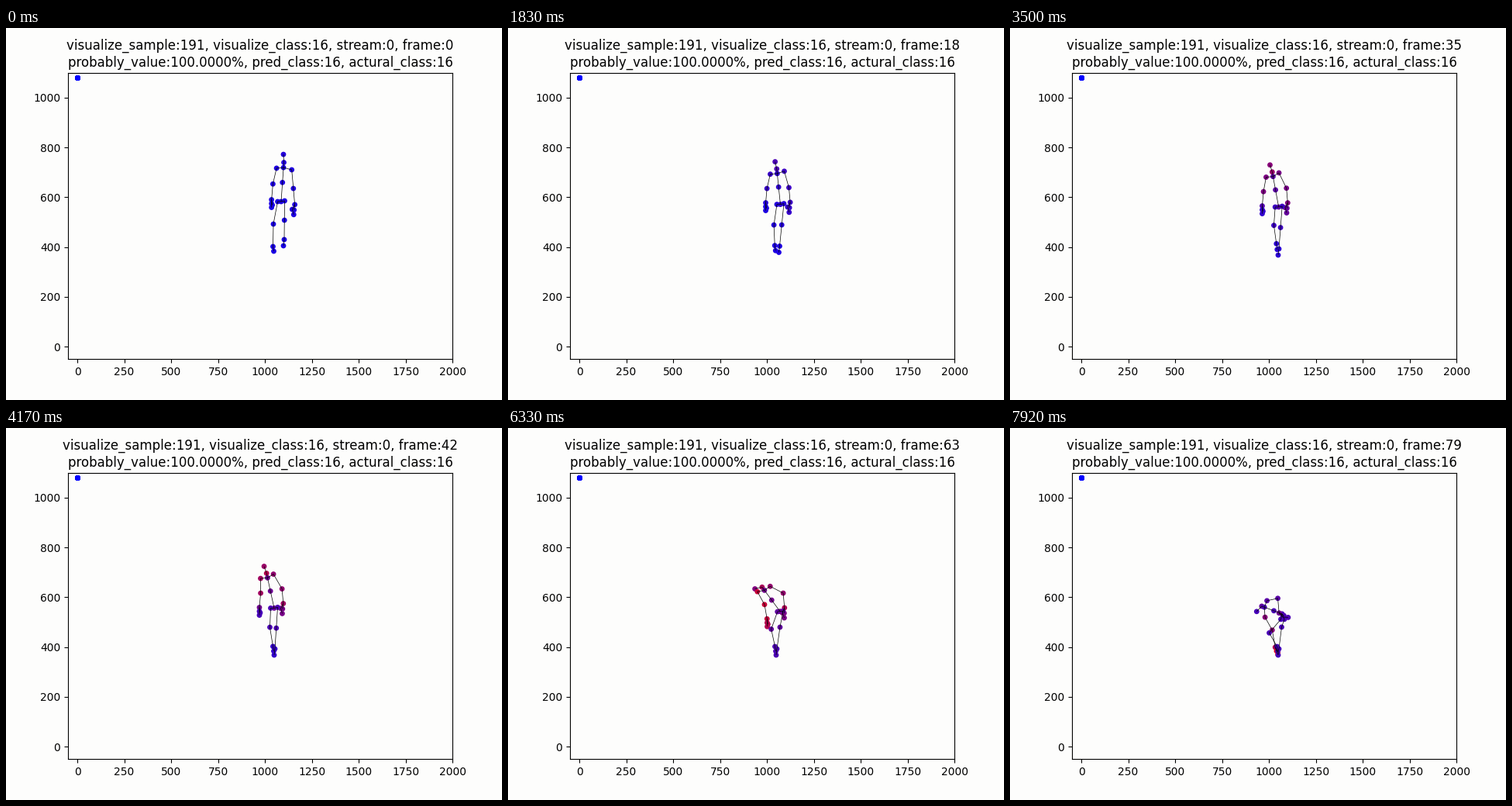
A matplotlib script that plays this animation: 640 by 480 pixels, repeating every 8000 ms.

```python
import numpy as np
import matplotlib.pyplot as plt
from matplotlib.animation import FuncAnimation
from matplotlib.collections import LineCollection

W, H, DPI = 640, 480, 100
LOOP_MS, STEP_MS = 8000, 40
XLIM, YLIM = (-50, 2000), (-50, 1100)
PAPER = "#fdfdfc"

# Joints that share a colour: names, peak share of red, pose where it peaks
GROUPS = [
    ("head", .52, 48),
    ("neck", .65, 51),
    ("chest mid base", .38, 54),
    ("l_shoulder l_elbow", .70, 58),
    ("l_wrist", .68, 67),
    ("l_palm l_thumb l_tip", .80, 79),
    ("r_shoulder r_elbow", .53, 53),
    ("r_wrist", .62, 55),
    ("r_palm r_thumb r_tip", .42, 53),
    ("l_hip r_hip l_knee r_knee", .28, 60),
    ("l_ankle l_foot r_ankle r_foot", .20, 66),
]
JOINTS = [j for names, _, _ in GROUPS for j in names.split()]

CHAINS = ["head neck chest mid base"]
for side in "lr":
    CHAINS += [c.replace("*", side + "_") for c in (
        "chest *shoulder *elbow *wrist *palm *tip",
        "*wrist *thumb",
        "base *hip *knee *ankle *foot")]
CHAINS = [[JOINTS.index(j) for j in c.split()] for c in CHAINS]


def ease(n, start, end):
    u = min(max((n - start) / (end - start), 0), 1)
    return u * u * (3 - 2 * u)


def ray(p, length, deg):
    """Point at a distance from p; 0 degrees hangs down, 90 points right."""
    a = np.radians(deg)
    return p + length * np.array([np.sin(a), np.cos(a)])


def to_data(p):
    """Stage pixels, y down, to axes data."""
    return ax.transData.inverted().transform(p * [1, -1] + [0, H])


def pose(n):
    """All joints at pose n, in stage pixels."""
    settle, walk = ease(n, 0, 18), ease(n, 0, 28)
    bow, reach = ease(n, 51, 79), ease(n, 60, 79)
    size = 1.1 - 0.1 * settle
    j = {}

    # Trunk leans forward and foreshortens as the figure bows
    lean = -4 + 5 * settle + 0.27 * n + 47 * bow
    nod = 7 + 60 * ease(n, 48, 63)
    j["base"] = np.array([355 - 9 * ease(n, 0, 42) + 5 * ease(n, 51, 63),
                          224 + n / 5])
    j["mid"] = ray(j["base"], 22.5 * size * (1 - 0.5 * bow), 180 + lean)
    j["chest"] = ray(j["mid"], 17.5 * size * (1 - 0.25 * bow), 180 + lean)
    j["neck"] = ray(j["chest"], 6 * size * (1 - 0.4 * bow), 180 + lean)
    j["head"] = ray(j["neck"], 9.5 * size, 180 + lean + nod)

    # Left arm swings across, then reaches to the ground
    j["l_shoulder"] = ray(j["chest"], 9 + 4 * reach, -85 + 89 * reach)
    j["l_elbow"] = ray(j["l_shoulder"], 19 * size, -13 + 42 * ease(n, 30, 62))
    j["l_wrist"] = ray(j["l_elbow"], 18.5 * size + 4 * reach,
                       -5 + 15 * ease(n, 45, 63))
    for name, length, deg in (("palm", 5, 0), ("thumb", 7, 8), ("tip", 10, 0)):
        j["l_" + name] = ray(j["l_wrist"], length, deg + 20 * reach)

    # Right arm opens outward with the bow
    j["r_shoulder"] = ray(j["chest"], 11 - 2 * walk,
                          75 + 47 * walk + 36 * reach)
    j["r_elbow"] = ray(j["r_shoulder"], 22 * size * (1 - 0.35 * bow),
                       5 + 0.6 * n + 50 * bow)
    j["r_wrist"] = ray(j["r_elbow"], 19 * size, 5)
    for name, length, deg in (("palm", 7, -28), ("thumb", 7, -8), ("tip", 13, -6)):
        j["r_" + name] = ray(j["r_wrist"], length, deg + 70 * reach)

    # Left foot lifts once, right foot steps in, knees bend with the bow
    lift = np.exp(-((n - 28) / 7) ** 2)
    j["l_hip"] = j["base"] + [-4.5 + 3 * bow, 7 * reach]
    j["r_hip"] = j["base"] + [4.5 - 1.5 * bow, 8 * reach - 1]
    j["l_ankle"] = np.array([344.5 - 2 * lift, 282 - 10 * lift])
    j["r_ankle"] = np.array([359 - 12 * walk, 273 + 12 * walk])
    j["l_foot"] = j["l_ankle"] + [1, 6 + 4 * lift]
    j["r_foot"] = j["r_ankle"] + [-1, 8]
    j["l_knee"] = (j["l_hip"] + j["l_ankle"]) / 2 - [2.5 + 10 * bow, 0]
    j["r_knee"] = (j["r_hip"] + j["r_ankle"]) / 2 - [0, 9 * bow]
    return np.array([j[name] for name in JOINTS])


def colours(n):
    red = np.array([0.1 + peak * np.exp(-((n - centre) / 30) ** 2)
                    for names, peak, centre in GROUPS for _ in names.split()])
    return np.column_stack([red, 0 * red, 1 - red])


fig, ax = plt.subplots(figsize=(W / DPI, H / DPI), dpi=DPI, facecolor=PAPER)
ax.set(xlim=XLIM, ylim=YLIM, facecolor=PAPER)

# The second, absent body: all of its joints rest on one spot.
ax.scatter([0] * 25, [1080] * 25, s=15, color=(0, 0, 1))
dots = ax.scatter([0] * len(JOINTS), [0] * len(JOINTS), s=15)
bones = LineCollection([], colors="black", linewidths=0.5, zorder=2)
ax.add_collection(bones, autolim=False)
title = ax.set_title("")


def draw(i):
    # Twelve ticks a second; the third of every six is held twice.
    beat, tick = divmod(int((i * STEP_MS + STEP_MS - 1) * 0.012), 6)
    n = 5 * beat + tick - (tick > 2)
    points = to_data(pose(n))
    dots.set_offsets(points)
    dots.set_color(colours(n))
    bones.set_segments([points[c] for c in CHAINS])
    title.set_text(
        f"visualize_sample:191, visualize_class:16, stream:0, frame:{n}\n"
        "probably_value:100.0000%, pred_class:16, actural_class:16")
    return dots, bones, title


anim = FuncAnimation(fig, draw, frames=LOOP_MS // STEP_MS, interval=STEP_MS,
                     repeat=True, repeat_delay=0)
plt.show()
```
